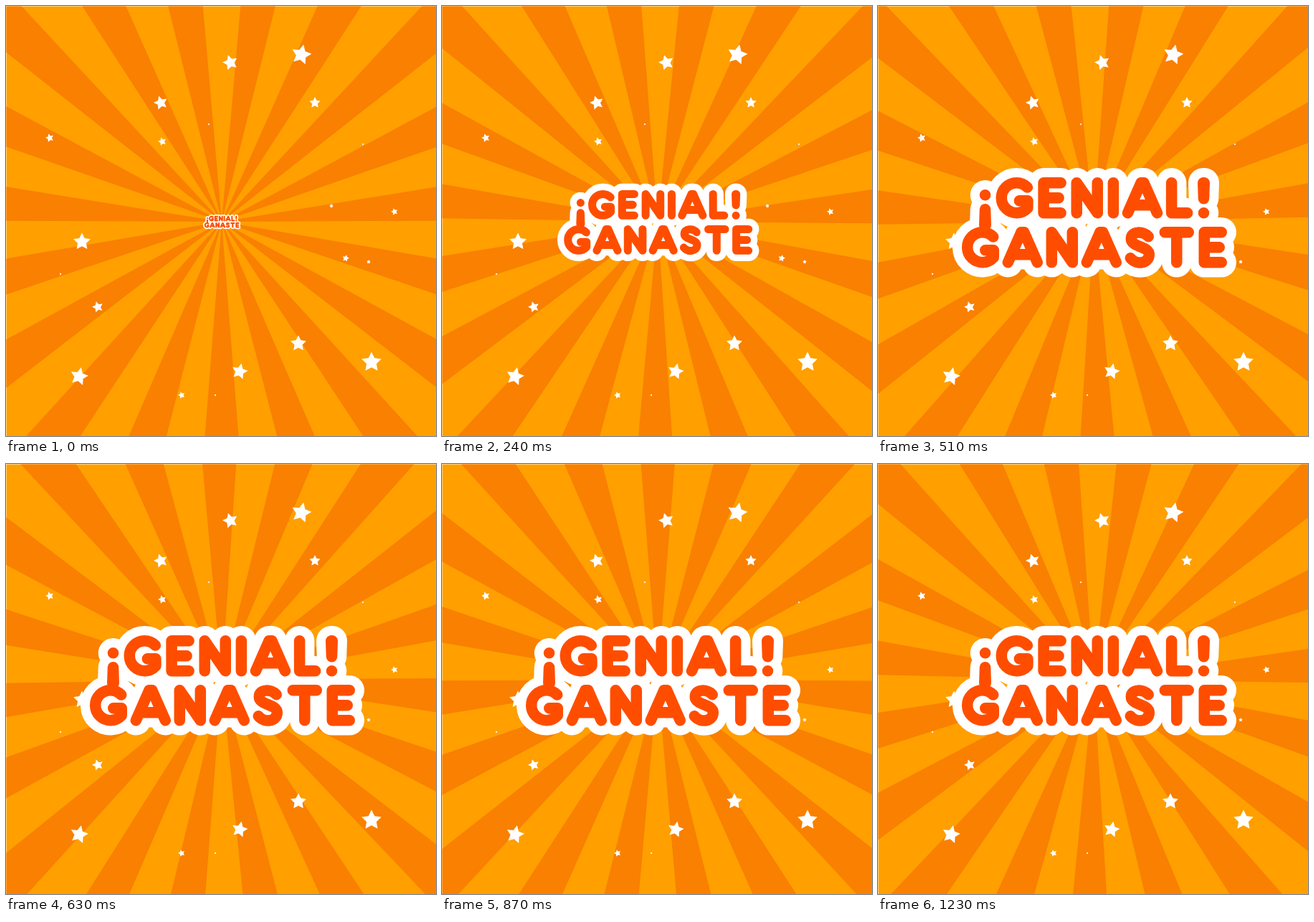
Write an HTML page that moves like this. It is 600 px wide and 600 px high and loops after 1.26 s.

```html
<!DOCTYPE html>
<html lang="es">
<head>
<meta charset="utf-8">
<title>¡Genial! Ganaste</title>
<style>
  html, body { margin: 0; width: 100%; height: 100%; overflow: hidden; background: #fff; }
  svg { display: block; width: 600px; height: 600px; }
  #title { fill: none; stroke-linecap: round; stroke-linejoin: round; }
</style>
</head>
<body>
<svg viewBox="0 0 600 600">
  <clipPath id="stage"><rect x=".5" y=".5" width="600" height="600"/></clipPath>
  <g clip-path="url(#stage)">
    <rect width="600" height="600" fill="#ff9f00"/>
    <path id="rays" fill="#f98000"/>
  </g>
  <path id="stars" fill="#fff"/>
  <g id="title" role="img" aria-label="¡GENIAL! GANASTE">
    <g id="halo" stroke="#fff"></g>
    <g id="letters" stroke="#ff4d00"></g>
  </g>
</svg>
<script>
const $ = id => document.getElementById(id);
const STEP = 30, STEPS = 42, GROW_STEPS = 12;
const START_SCALE = 0.132, TURN_PER_STEP = -16 / 7;
const CENTER = 301, SECTOR = 360 / 38, INSET = 0.25;
const PEN = 15.5, HALO = 13;

const polar = (x, y, r, deg) => {
  const a = deg * Math.PI / 180;
  return `${x + r * Math.cos(a)} ${y + r * Math.sin(a)}`;
};

// Every second sector is dark, and slightly narrower than the light ones
let rays = '';
for (let a = SECTOR; a < 360; a += 2 * SECTOR) {
  const rim = deg => polar(CENTER, CENTER, 460, deg);
  rays += `M${CENTER} ${CENTER}L${rim(a + INSET)}L${rim(a + SECTOR - INSET)}Z`;
}
$('rays').setAttribute('d', rays);

// Stars grouped by lean: x, y, radius
const star = (x, y, r, tilt) => 'M' + Array.from({ length: 10 }, (_, i) =>
  polar(x, y, i % 2 ? r / 2 : r, tilt - 90 + i * 36)).join('L') + 'Z';
const lean = (tilt, places) => places.map(([x, y, r]) => star(x, y, r, tilt)).join('');
$('stars').setAttribute('d',
  lean(-16, [[313, 79, 11], [216, 135, 10], [61, 184, 6], [218, 189, 6],
             [454, 279, 3], [542, 287, 5], [128, 420, 8], [245, 543, 5]]) +
  lean(0, [[431, 135, 8], [106, 329, 12.5], [408, 471, 11.5], [510, 497, 14.5], [506, 357, 3],
           [283, 165, 1.6], [498, 193, 1.6], [76, 374, 1.6], [292, 543, 1.6]]) +
  lean(13, [[412, 68, 14.5], [102, 517, 13], [326, 510, 11.5], [474, 352, 5]]));

// Pen strokes of each letter, 42 units tall
const glyphs = {
  G: 'M36 6.3A21 21 0 1 0 36.5 35V25H25',
  E: 'M24 0H0V42H24M0 21H21',
  N: 'M0 42V0L29 42V0',
  I: 'M0 0V42',
  A: 'M0 42L18.5 0H22.5L41 42M8 31H33',
  L: 'M0 0V42H22',
  S: 'M25 6C18 -2 1 -2 1 9C1 21 26 19 26 31C26 44 8 46 0 36',
  T: 'M0 0H33M16.5 0V42',
  '!': 'M0 0L.75 22L1.5 0M.75 42h.01',
  '¡': 'M.75 17h.01M0 59L.75 37L1.5 59'
};

// Spread the letters evenly from left to right; A tucks in on both sides
function write(layer, text, left, right, top) {
  const tuck = c => c === 'A' ? 2 : 0;
  const letters = [...text].map(c => {
    const path = document.createElementNS('http://www.w3.org/2000/svg', 'path');
    path.setAttribute('d', glyphs[c]);
    layer.append(path);
    return { path, tuck: tuck(c), width: path.getBBox().width + PEN };
  });
  const used = letters.reduce((sum, l) => sum + l.width - 2 * l.tuck, 0);
  const gap = (right - left - used) / (letters.length - 1);
  let x = left + PEN / 2;
  for (const l of letters) {
    l.path.setAttribute('transform', `translate(${x - l.tuck} ${top + PEN / 2})`);
    x += l.width - 2 * l.tuck + gap;
  }
}
for (const [id, width] of [['halo', PEN + 2 * HALO], ['letters', PEN]]) {
  const layer = $(id);
  layer.setAttribute('stroke-width', width);
  write(layer, '¡GENIAL!', 141, 463, 239);
  write(layer, 'GANASTE', 117, 487, 308);
}

const origin = performance.now();
function draw(now) {
  const step = Math.floor(Math.max(0, now - origin) / STEP) % STEPS;
  const scale = START_SCALE + (1 - START_SCALE) * Math.min(1, step / GROW_STEPS);
  $('rays').setAttribute('transform', `rotate(${step * TURN_PER_STEP} ${CENTER} ${CENTER})`);
  $('title').setAttribute('transform',
    `translate(${CENTER} ${CENTER}) scale(${scale}) translate(${-CENTER} ${-CENTER})`);
  requestAnimationFrame(draw);
}
draw(origin);
</script>
</body>
</html>
```
